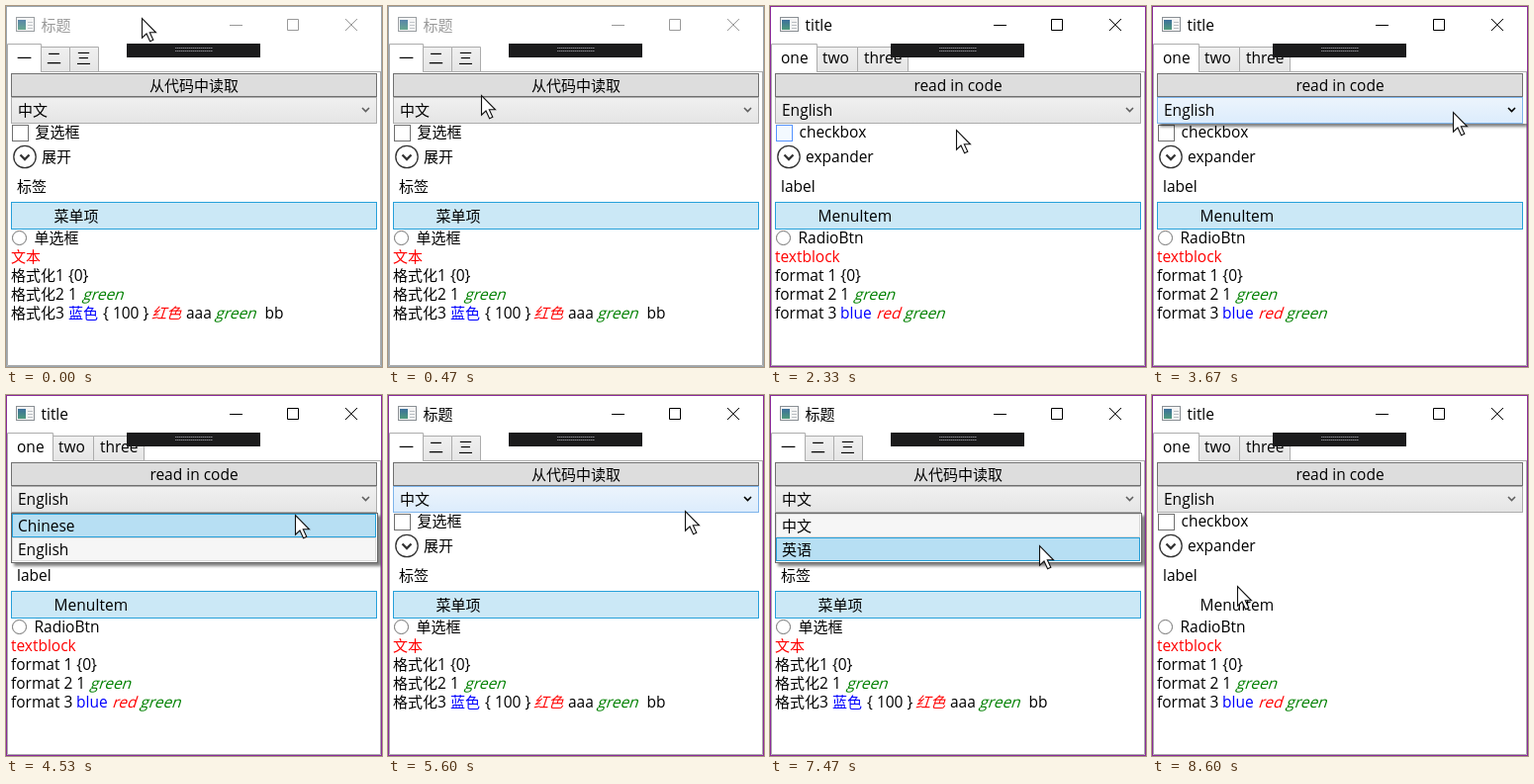
Animation, 380 px wide and 365 px high, one loop 9.34 s. Source, as an HTML page:

```html
<!DOCTYPE html>
<html lang="en">
<head>
<meta charset="utf-8">
<title>Language switch</title>
<style>
  html, body { margin: 0; width: 100%; height: 100%; overflow: hidden; background: #fff; }
  svg { display: block; width: 380px; height: 365px; }
  text { font: 15.5px "Open Sans", "Noto Sans CJK SC", "Noto Sans CJK", sans-serif; white-space: pre; }
  text.cjk { font: 15px "Noto Sans CJK SC", "Noto Sans CJK", sans-serif; }
  svg.isEn .zh, svg:not(.isEn) .en { display: none; }
  #drop { filter: drop-shadow(3px 3px 1.5px rgba(0, 0, 0, .5)); }
</style>
</head>
<body>
<svg id="stage" viewBox="0 0 380 365" xmlns="http://www.w3.org/2000/svg">
  <defs>
    <linearGradient id="grey" x2="0" y2="1"><stop stop-color="#f0f0f0"/><stop offset="1" stop-color="#e5e5e5"/></linearGradient>
    <linearGradient id="blue" x2="0" y2="1"><stop stop-color="#ecf4fc"/><stop offset="1" stop-color="#dcecfc"/></linearGradient>
    <linearGradient id="pane" x2="0" y2="1"><stop stop-color="#3c6f9c"/><stop offset="1" stop-color="#4f9a7c"/></linearGradient>
    <clipPath id="below"><rect y="119" width="380" height="60"/></clipPath>
  </defs>
  <rect width="380" height="365" fill="#fff"/>
  <g id="icon">
    <rect x="10.5" y="11.5" width="18" height="14" fill="#f4f4f4" stroke="#8a8f94"/>
    <rect x="12" y="14" width="8" height="10" fill="url(#pane)"/>
    <path d="M22 16.5h5M22 19.5h5M22 22.5h5" stroke="#b9bec3"/>
  </g>
  <path id="caption" fill="none" d="M226 19.5h13M284.5 13.5h11v11h-11zM343 13l12 12M355 13l-12 12"/>
  <g id="tabs" stroke="#acacac"></g>
  <path d="M1.5 66V363.5H378.5V66" fill="none" stroke="#acacac"/>
  <rect x="5.5" y="68.5" width="369" height="23" fill="#ddd" stroke="#707070"/>
  <rect id="combo" x="5.5" y="92.5" width="369" height="26"/>
  <path id="arrow" d="M360 103l3.5 3.5 3.5-3.5" fill="none" stroke-width="1.6"/>
  <rect id="check" x="6.5" y="120.5" width="16" height="16"/>
  <circle id="ring" cx="19" cy="152.5" r="11.2" stroke-width="1.3"/>
  <path d="M14.5 150.5l4.5 4.5 4.5-4.5" fill="none" stroke="#333" stroke-width="2.3"/>
  <rect id="menu" x="5.5" y="198.5" width="369" height="27" fill="#cbe8f6" stroke="#26a0da"/>
  <circle cx="13.5" cy="234.5" r="7" fill="#fff" stroke="#707070"/>
  <g id="labels"></g>
  <g clip-path="url(#below)">
    <g id="drop">
      <rect x="5.5" y="119.5" width="370" height="50" fill="#fff" stroke="#6a6a6a"/>
      <rect class="item" x="6.5" y="120.5" width="367" height="23"/>
      <rect class="item" x="6.5" y="144.5" width="367" height="23"/>
      <g id="options"></g>
    </g>
  </g>
  <rect x="122" y="38" width="135" height="14" fill="#1b1b1c"/>
  <path d="M171 42.5h38M171 45.5h38" stroke="#85858a" stroke-dasharray="1 1"/>
  <path d="M171 42.5h38M171 45.5h38" stroke="#55555a"  stroke-dasharray="1 1" stroke-dashoffset="1"/>
  <rect id="frame" x=".5" y=".5" width="379" height="364" fill="none"/>
  <path id="pointer" d="M.5 .5V20.2L5 16l3.6 7.7 3.2-1.4-3.5-7.5h6.2z" fill="#fff" stroke="#111" stroke-width="1.1"/>
</svg>
<script>
const $ = id => document.getElementById(id);
const LOOP = 9340, TICKS_PER_MS = 0.015;

function add(parent, tag, attrs, content = '') {
  const el = document.createElementNS('http://www.w3.org/2000/svg', tag);
  for (const key in attrs) el.setAttribute(key, attrs[key]);
  el.textContent = content;
  return $(parent).appendChild(el);
}

function write(parent, lang, x, y, content, { fill = '#000', slant = false, anchor = 'start' } = {}) {
  const cjk = /[\u4e00-\u9fff]/.test(content) ? ' cjk' : '';
  return add(parent, 'text', {
    class: lang + cjk, fill, 'text-anchor': anchor, stroke: 'none',
    transform: `translate(${x} ${y})` + (slant ? ' skewX(-18)' : '')
  }, content);
}

function both(parent, x, y, zh, en, style) {
  return [write(parent, 'zh', x, y, zh, style), write(parent, 'en', x, y, en, style)];
}

// Tabs: each language has its own edges and text positions
function buildTabs(lang, names, edges, starts) {
  names.forEach((name, i) => {
    const [left, right] = [edges[i], edges[i + 1]];
    add('tabs', 'path', {
      class: lang, fill: i ? 'url(#grey)' : '#fff',
      d: i ? `M${left} 66.5V41.5H${right}V66.5z` : `M${left} 66.5V38.5H${right}V66.5H379`
    });
    write('tabs', lang, starts[i], 58, name);
  });
}
buildTabs('zh', ['一', '二', '三'], [1.5, 35.5, 64.5, 93.5], [11, 41, 71]);
buildTabs('en', ['one', 'two', 'three'], [1.5, 47.5, 88.5, 139.5], [11, 53, 95]);

const titles = both('labels', 35.5, 25, '标题', 'title');
both('labels', 190, 86, '从代码中读取', 'read in code', { anchor: 'middle' });
both('labels', 12, 111, '中文', 'English');
both('labels', 29.5, 133, '复选框', 'checkbox');
both('labels', 36, 158, '展开', 'expander');
both('labels', 11, 188, '标签', 'label');
both('labels', 48.5, 218, '菜单项', 'MenuItem');
both('labels', 28.5, 240, '单选框', 'RadioBtn');
both('labels', 5, 259, '文本', 'textblock', { fill: '#f00' });
both('options', 12, 138, '中文', 'Chinese');
both('options', 12, 162, '英语', 'English');

const blue = { fill: '#00f' }, red = { fill: '#f00', slant: true }, green = { fill: '#008000', slant: true };
const runs = {
  zh: [
    [278, [5, '格式化'], [50, '1 {0}']],
    [297, [5, '格式化'], [50, '2 1'], [77, 'green', green]],
    [316, [5, '格式化'], [50, '3'], [63, '蓝色', blue], [98, '{ 100 }'], [147, '红色', red],
      [182, 'aaa'], [211, 'green', green], [261.5, 'bb']]
  ],
  en: [
    [278, [5, 'format 1 {0}']],
    [297, [5, 'format 2 1'], [84.5, 'green', green]],
    [316, [5, 'format 3'], [71, 'blue', blue], [107, 'red', red], [135, 'green', green]]
  ]
};
for (const lang in runs)
  for (const [y, ...parts] of runs[lang])
    for (const [x, content, style] of parts) write('labels', lang, x, y, content, style);

// Pointer moves: first tick, last tick, end x, end y
const start = [137, 12];
const moves = [
  [1, 8, 88, 101], [13, 15, 88, 112], [18, 24, 96, 159], [29, 35, 188, 125], [36, 42, 280, 115],
  [48, 53, 304, 107], [64, 69, 290, 124], [80, 84, 300, 117], [85, 92, 270, 108],
  [105, 107, 270, 142], [110, 112, 272, 152], [118, 123, 104, 213], [126, 129, 86, 193]
];
// Drop-down: first tick shown, tick closed
const openings = [[13, 28], [55, 75], [100, 117]];
const englishSpans = [[28, 75], [117, 141]];
const within = (tick, [from, to]) => tick >= from && tick < to;

function pointerAt(tick) {
  let [x, y] = start;
  for (const [first, last, endX, endY] of moves) {
    const p = Math.min(1, Math.max(0, (tick - first + 1) / (last - first + 1)));
    x += (endX - x) * p;
    y += (endY - y) * p;
  }
  return [Math.round(x), Math.round(y)];
}

function paint(el, fill, stroke) {
  el.setAttribute('fill', fill);
  el.setAttribute('stroke', stroke);
}

const items = document.querySelectorAll('.item');

function render(tick) {
  const [x, y] = pointerAt(tick);
  const active = tick >= 12;
  const english = englishSpans.some(span => within(tick, span));
  const opening = openings.find(span => within(tick, span));
  const ink = active ? '#000' : '#999';

  $('stage').classList.toggle('isEn', english);
  $('pointer').setAttribute('transform', `translate(${x} ${y})`);
  $('frame').setAttribute('stroke', active ? '#8b2a9b' : '#9aa5ae');
  $('caption').setAttribute('stroke', ink);
  $('icon').setAttribute('opacity', active ? 1 : .85);
  titles.forEach(title => title.setAttribute('fill', ink));

  const overCombo = y >= 92 && y < 119;
  paint($('combo'), `url(#${overCombo ? 'blue' : 'grey'})`, overCombo ? '#7eb4ea' : '#acacac');
  $('arrow').setAttribute('stroke', overCombo ? '#000' : '#606060');

  const hover = (from, to) => !opening && y >= from && y < to;
  const overCheck = hover(119, 138), overRing = hover(138, 167);
  paint($('check'), overCheck ? '#f3f9ff' : '#fff', overCheck ? '#5593ff' : '#707070');
  paint($('ring'), overRing ? '#f3f9ff' : '#fff', overRing ? '#5593ff' : '#333');
  $('menu').style.display = tick >= 126 && y < 198 ? 'none' : '';

  $('drop').style.display = opening ? '' : 'none';
  if (!opening) return;
  const slide = Math.min(0, -51 + 25.5 * (tick - opening[0]));
  $('drop').setAttribute('transform', `translate(0 ${slide})`);
  const hovered = y < 120 ? -1 : y < 144 ? 0 : 1;
  items.forEach((item, i) => {
    const selected = i === +english;
    if (i === hovered) paint(item, '#b7dff3', '#26a0da');
    else if (selected && hovered < 0) paint(item, '#cbe8f6', '#26a0da');
    else if (selected) paint(item, '#f6f6f6', '#dadada');
    else paint(item, 'none', 'none');
  });
}

function loop() {
  const time = performance.now() % LOOP;
  render(Math.floor((time + 4) * TICKS_PER_MS));
  requestAnimationFrame(loop);
}
loop();
</script>
</body>
</html>
```
